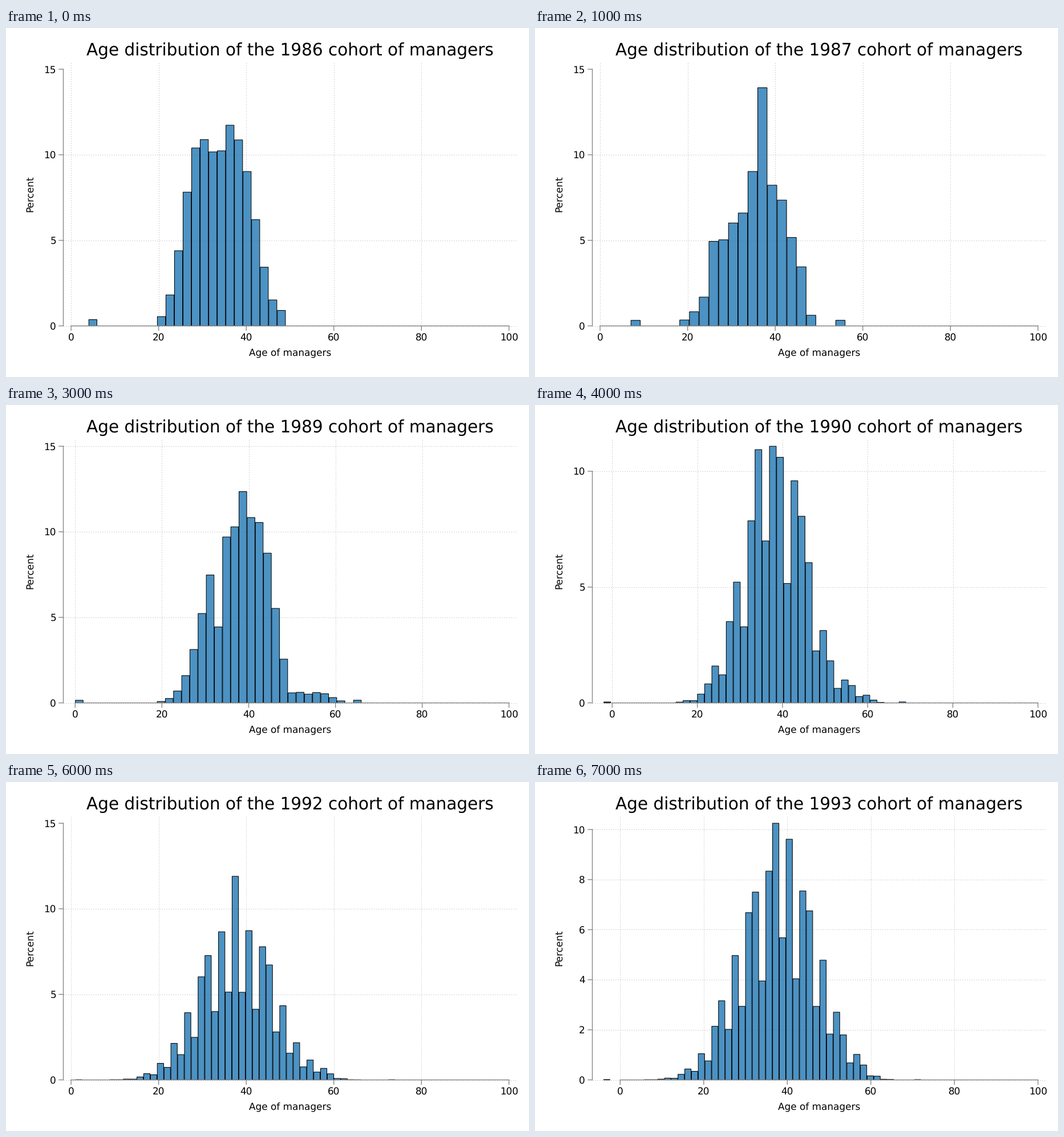
Animation of 917 by 611 pixels, one loop 8 s. Source, as a matplotlib script:

```python
import matplotlib.pyplot as plt
import numpy as np
from matplotlib.animation import FuncAnimation
from matplotlib.patches import Rectangle

W, H, DPI = 917, 611, 64
PT = 72 / DPI                                  # points per pixel
LEFT, RIGHT, TOP, BASE = 100.5, 895.5, 61, 521.5
X_MIN, X_MAX, Y_MAX = 114.1, 881.9, 72.2       # pixels of the data range
BLUE, AXIS, GRID = "#1f77b4", "#808080", "#a8a8a8"
SMALL, LARGE = 16.9, 29.56
FIRST_YEAR = 1986

plt.rcParams.update({"font.family": "DejaVu Sans", "text.hinting": "none"})


def params(lo, hi, bins, peak, stray, *bells):
    """Age range, bin count, tallest bar, share at both ends, (centre, spread, height) bells."""
    return np.array([lo, hi, bins, peak, stray, *np.ravel(bells)])


COHORTS = {
    1986: params(4, 49, 23, 11.73, 0.35, (29, 3.5, 4.7), (38.2, 4.2, 5), (36.5, 1, 0.6)),
    1988: params(10, 62, 22, 16.11, 0.5, (34, 6.5, 3.2), (42.8, 3, 4), (34.6, 1.2, 4.2)),
    1989: params(0, 66, 35, 12.35, 0.15, (35, 5, 4.7), (43.3, 3.3, 3.8), (38.5, 0.8, 1.3)),
    1990: params(-2, 69, 42, 11.08, 0.04, (35.5, 6, 4.2), (43.5, 4.8, 2.7), (35.7, 0.8, 2.1)),
    1992: params(1, 74, 47, 11.90, 0.01, (35, 7, 4), (45, 4.5, 2), (37.5, 1.2, 1.7)),
    1993: params(-4, 72, 47, 10.25, 0.01, (34.5, 7.5, 3.7), (45.5, 4.8, 2), (38.8, 1.4, 1.6)),
}
for year in (1987, 1991):
    COHORTS[year] = (COHORTS[year - 1] + COHORTS[year + 1]) / 2


def bell(x, centre, spread, height):
    return height * np.exp(-0.5 * ((x - centre) / spread) ** 2)


class Hist:
    """Whole ages sorted into bins, which gives the uneven bars."""

    def __init__(self, year):
        lo, hi, bins, peak, stray, *bells = COHORTS[year]
        lo, hi, bins = round(lo), round(hi), int(bins)
        ages = np.arange(lo, hi + 1)
        share = sum(bell(ages, *b) for b in np.reshape(bells, (3, 3)))
        if year > 1988:
            share += bell(ages, 56, 3, 0.3)
        share[[0, -1]] += stray
        values, self.edges = np.histogram(ages, bins, (lo, hi), weights=share)
        values[values < stray / 2] = 0
        self.values = values * peak / values.max()

        step = 2 if peak < 10.7 else 5
        self.ticks = range(0, 11 if peak < 11.5 else 16, step)
        self.top = max(peak, self.ticks[-1])
        self.x_min = min(0, lo - (hi - lo) / bins / 2)
        # only one of the two outermost grid lines shows when the range starts at 0
        flush = self.top == self.ticks[-1]
        self.zero_grid = self.x_min < 0 or flush
        self.top_grid = self.x_min < 0 or not flush

    def x(self, age):
        return X_MIN + (X_MAX - X_MIN) * (age - self.x_min) / (100 - self.x_min)

    def y(self, percent):
        return BASE - (BASE - Y_MAX) * percent / self.top


HISTS = [Hist(year) for year in sorted(COHORTS)]

fig = plt.figure(figsize=(W / DPI, H / DPI), dpi=DPI, facecolor="white")
ax = fig.add_axes([0, 0, 1, 1])


def line(x1, y1, x2, y2):
    ax.plot([x1, x2], [y1, y2], color=AXIS, lw=1.3 * PT, snap=False, zorder=3)


def dots(x1, y1, x2, y2):
    ax.plot([x1, x2], [y1, y2], color=GRID, lw=PT, ls=(0, (1, 3)),
            dash_capstyle="butt", zorder=1)


def label(x, y, text, size=SMALL, ha="center", **kw):
    ax.text(x, y, text, fontsize=size * PT, ha=ha, va="baseline", **kw)


def draw_bars(h):
    for value, a, b in zip(h.values, h.edges, h.edges[1:]):
        if value > 0:
            left, right = h.x(a) + 0.4, h.x(b) - 0.4
            ax.add_patch(Rectangle((left, BASE), right - left, h.y(value) - BASE,
                                   fc=(BLUE, 0.8), ec="black", lw=1.05 * PT,
                                   snap=False, zorder=2))


def draw_axes(h):
    for v in h.ticks:
        y = h.y(v)
        if v < h.ticks[-1] or h.top_grid:
            dots(LEFT, y, RIGHT, y)
        line(93, y, LEFT, y)
        label(88, y + 6.2, str(v), ha="right")
    line(LEFT, BASE, LEFT, h.y(h.ticks[-1]))

    for age in range(0, 101, 20):
        x = h.x(age)
        if 0 < age < 100 or (age == 0 and h.zero_grid):
            dots(x, BASE, x, TOP)
        line(x, BASE, x, 529.5)
        label(x, 547.2, str(age))
    line(h.x(0), BASE, X_MAX, BASE)


def update(n):
    ax.clear()
    ax.set(xlim=(0, W), ylim=(H, 0))
    ax.axis("off")
    draw_axes(HISTS[n])
    draw_bars(HISTS[n])
    label(498.2, 49, f"Age distribution of the {FIRST_YEAR + n} cohort of managers", LARGE)
    label(498.2, 574, "Age of managers")
    label(47.3, 289.8, "Percent", rotation=90, rotation_mode="anchor")
    return []


anim = FuncAnimation(fig, update, frames=len(HISTS), interval=1000, repeat=True,
                     init_func=lambda: update(0))
plt.show()
```
